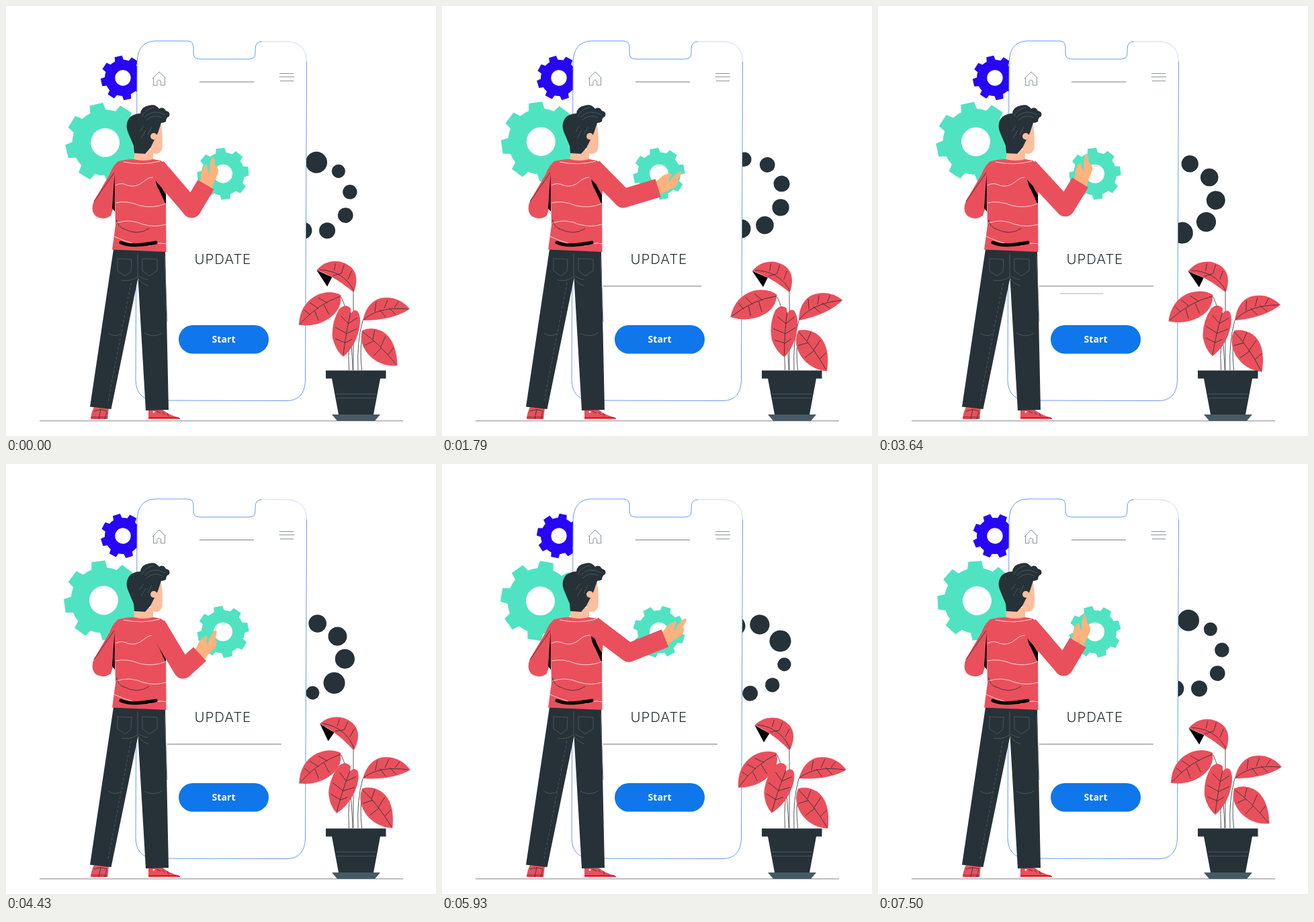
Animation, 640 px wide and 640 px high, one loop 7710 ms. Source, as an HTML page:

```html
<!DOCTYPE html>
<html lang="en">
<head>
<meta charset="utf-8">
<title>Update</title>
<style>
  html, body { margin: 0; width: 100%; height: 100%; overflow: hidden; background: #fff; }
  svg { display: block; width: 100vw; height: 100vh; }
  .ink { fill: #263238; }
  .red { fill: #e9505c; }
  .teal { fill: #50e3c2; }
  .skin { fill: #ffbe9d; }
  .line { fill: none; stroke: #263238; stroke-width: .8; }
  .faint { fill: none; stroke: #55666f; stroke-width: .7; }
  .wave { fill: none; stroke: #ffe3e3; stroke-width: .9; }
  .rule { fill: none; stroke: #555; stroke-width: .8; }
</style>
</head>
<body>
<svg viewBox="0 0 640 640">
  <path id="blueGear" fill="#2705f5" fill-rule="evenodd"/>
  <path id="bigGear" class="teal" fill-rule="evenodd"/>
  <g id="dots" class="ink"></g>

  <!-- phone -->
  <path fill="#fff" d="M195 84Q196 53 222 52H270Q279 52 279 62V70Q279 79 288 79H362Q371 79 371 70V64Q371 53 381 53H418Q447 54 447.500 83L445.500 558Q444 586 420 587.500L218 587Q194 584 193 557Z"/>
  <g fill="none" stroke="#4380f2" stroke-width=".8">
    <path d="M381 53Q371 53 371 64V70Q371 79 362 79H288Q279 79 279 70V62Q279 52 270 52H222Q196 53 195 84L193 557Q194 584 218 587L420 587.500Q444 586 445.500 558L447.500 83"/>
    <path stroke="#bccdf5" d="M381 53H418Q447 54 447.500 83"/>
  </g>
  <path class="faint" d="M218 108L228 98 237 107M219.500 107V118H225V112Q228 108.500 230.500 112V118H236.500V106.500"/>
  <path class="faint" d="M407 100.500H428M406.500 105.500H429M408 111.500H428"/>
  <path class="rule" d="M288 113H369"/>
  <path id="phoneGear" class="teal" fill-rule="evenodd"/>
  <text x="322.800" y="384" text-anchor="middle" font-family="Inter, sans-serif" font-size="20.500" font-weight="300" letter-spacing=".9" class="ink">UPDATE</text>
  <path id="rule1" class="rule"/>
  <path id="rule2" class="rule" style="stroke:#999"/>
  <rect x="257" y="475" width="134" height="42.500" rx="21.200" fill="#0f76ec"/>
  <text x="324" y="500.500" text-anchor="middle" font-family="'Open Sans', sans-serif" font-size="14" font-weight="700" letter-spacing=".1" fill="#fff">Start</text>

  <path d="M50 617.500H591" stroke="#8c8c8c" stroke-width="1.200"/>

  <!-- plant -->
  <path class="line" d="M517 424V542M511 500Q509 520 510.500 542M531 468Q522 500 524 542M531 486Q526 510 529.500 542M499 433Q514 465 516 542"/>
  <g id="leaves"></g>
  <path fill="#455a64" d="M485 608H557L549 617.500H493Z"/>
  <path class="ink" d="M476 542.500H565.500V554.500H557L547 608H495L485 554.500H476Z"/>
  <path class="faint" d="M491 577.500H551M492 583.500H550"/>

  <!-- man -->
  <path class="red" d="M131 597L153 599 151 615H126Q127 604 131 597ZM212 601H233Q245 610 259 613V615H212Z"/>
  <path class="line" d="M131 603Q141 599 150 603L147 615M141 600L138 615M126 612H151M224 603L230 606M233 604L236 608M240 606L242 611M212 612.500H257"/>
  <circle cx="220" cy="604" r="1.500" fill="#fff"/>
  <path class="ink" d="M160 362L237 365 242 601 208 602 196.500 405 156.500 600 125 596.500Z"/>
  <path class="faint" d="M166 376L187 377 186 395 177 402 166 394ZM203 376L225 377V394L213 402 203 394ZM196 368V404Q200 412 212 417M196 403Q184 411 172 408M198 402Q206 407 211 407M152 487Q162 494 172 487M206 487Q221 495 233 486M236 372L240 470"/>
  <path class="faint" stroke-dasharray="4 3" d="M186 412L152 588"/>
  <path class="skin" d="M192 214H219V231Q204 236 190 230Z"/>
  <path class="skin" d="M229 172Q234 184 232.500 211Q231 220 222 220L216 218 212 196Z"/>
  <path class="ink" d="M191 219L190 208 182 189Q176 175 185 165 192 160 200 160 201 150 213 148 222 145 228 153 234 149 238 156 245 157 243 164 238 166 238 172 235 174 231 174L226 189 215 211 207 220Z"/>
  <circle cx="220" cy="194" r="5" class="skin"/>
  <path class="faint" d="M202 165Q207 153 220 151M206 166Q218 152 237 162M209 170Q220 160 232 166M199 187L205 178M201 197L208 185M211 192L217 180"/>
  <path class="red" d="M166 232Q176 228 190 228 204 232 219 228L230 230Q242 236 242 248L238 285 238.500 366 158 362.500 163 326 161 250Z"/>
  <path class="red" d="M169 230Q160 235 154 251L131 290Q125 305 134 313 145 320 156 312L160 300 164 250Z"/>
  <path d="M161.500 250L158 301 162 306ZM223 246Q220 262 228 274L238 296V281Q229 268 223 246Z"/>
  <path class="line" d="M161 248L131 291"/>
  <path class="wave" d="M175 232Q202 238 229 231M163 267Q171 262 181 267 194 271 205 261 213 254 222 255M163 293Q180 289 199 297 219 302 238 294M164 323Q184 316 204 325 222 330 238 325M161 343Q176 350 188 353M212 357Q225 351 238 354"/>
  <path class="line" d="M174 331Q196 343 213 331M164 318Q167 328 175 332"/>
  <path fill="none" stroke="#000" stroke-width="5" stroke-linecap="round" d="M171 352Q182 357 198 355.500T223 352"/>
  <path id="hand" fill="#ffb27d" d="M-5-9L8-10Q18-13 28-8 30-5 22-3L17 2Q30-4 41-2 44 0 41 2L31 6Q30 13 20 13L8 11-5 10Z"/>
  <path id="arm" fill="none" stroke="#e9505c" stroke-width="28" stroke-linejoin="round"/>
</svg>
<script>
const LOOP = 7710, END = 7500, FPS = 14;
const $ = id => document.getElementById(id);
const rad = deg => deg * Math.PI / 180;
const set = (el, attrs) => { for (const k in attrs) el.setAttribute(k, attrs[k]); };
const add = (parent, tag, attrs) => {
  const el = document.createElementNS("http://www.w3.org/2000/svg", tag);
  set(el, attrs);
  return parent.appendChild(el);
};

// Swings around mid, `cycles` times per loop; highest at `peak` of a cycle.
const swing = (mid, amp, cycles, peak) => p => mid + amp * Math.cos(2 * Math.PI * (cycles * p - peak));
const rise = (t, from, to) => Math.min(1, Math.max(0, (t - from) / (to - from)));
// Nearly steady, settling at the end.
const settle = p => p + .45 * p ** 3 * (1 - p);

function gearPath(tip, root, hole, phase, ox = 0, oy = 0) {
  const at = (r, a) => `${ox + r * Math.cos(rad(a))} ${oy + r * Math.sin(rad(a))}`;
  let d = "";
  for (let k = 0; k < 8; k++) {
    const a = phase + k * 45;
    d += `${k ? `A${root} ${root} 0 0 1 ` : "M"}${at(root, a - 14)}L${at(tip, a - 9.7)} ${at(tip, a + 9.7)} ${at(root, a + 14)}`;
  }
  d += `A${root} ${root} 0 0 1 ${at(root, phase - 14)}Z`;
  return d + `M${ox + hole} ${oy}a${hole} ${hole} 0 1 0 ${-2 * hole} 0a${hole} ${hole} 0 1 0 ${2 * hole} 0Z`;
}
set($("bigGear"), { d: gearPath(59.5, 49, 21.5, -103, 1, .6) });
set($("blueGear"), { d: gearPath(33.2, 27, 11.7, -102) });
set($("phoneGear"), { d: gearPath(38.7, 32, 14, -96) });

for (let k = 0; k < 9; k++) {
  const a = rad(-88 + k * 39.5);
  add($("dots"), "circle", { cx: 4.8 + 52.3 * Math.cos(a), cy: 52.3 * Math.sin(a), r: k ? 9.4 + .65 * k : 16 });
}

const leaves = [
  { pivot: "517 426", sway: swing(3.2, 5.2, 4, .33), under: "M462 394L485 404 478 418Z",
    shape: "M517 426Q490 403 462 394 475 378 496 380.500 523 387 521 412 520 422 517 426Z",
    veins: "M518 424Q502 394 466 393M509 407L514 394M499 398L503 385M488 394L490 383M499 398L486 402" },
  { pivot: "499 432", sway: swing(5, 8.5, 1, .29),
    shape: "M498 430Q482 423 463 432 438 446 438 478 468 480 488 461 501 448 498 430Z",
    veins: "M498 432Q465 445 440 476M479 443L465 436M466 452L453 444M454 462L445 455M474 446L482 460M461 456L467 470" },
  { pivot: "531 468", sway: swing(0, 12, 5, .75),
    shape: "M531 468Q537 441 557 435 583 430 601 451 575 468 531 468Z",
    veins: "M532 467Q555 447 598 451M549 455L551 440M563 450L568 437M578 449L584 440M556 452L565 463M570 449L580 459" },
  { pivot: "530 484", sway: swing(6.5, 6.5, 3, .56),
    shape: "M530 483Q543 477 558 483 581 494 583 535 557 537 540 519 525 502 530 483Z",
    veins: "M531 485Q555 502 581 533M546 496L549 482M558 507L565 491M569 519L577 508M548 498L534 505M559 508L547 521" },
  { pivot: "512 450", sway: swing(2, 8.2, 1, .71),
    shape: "M513 450Q505 442 496 451 484 471 486 494 490 512 502 522 518 508 524 487 530 466 524 455 518 450 513 458Z",
    veins: "M513 456Q506 485 502 519M509 472L498 461M506 487L490 478M504 501L490 495M509 473L523 464M506 488L523 480M504 502L515 496" }
].map(({ pivot, sway, under, shape, veins }) => {
  const g = add($("leaves"), "g", {});
  if (under) add(g, "path", { d: under });
  add(g, "path", { class: "red", d: shape });
  add(g, "path", { class: "line", d: veins });
  return { g, pivot, sway };
});

const arm = {
  elbowX: swing(274, 13, 2, .78),
  elbowY: swing(293, 13, 2, .14),
  cuffX: swing(311, 23, 2, .65),
  cuffY: swing(267, 18, 2, .26),
  hand: swing(-55, 22, 2, .43)
};

function draw(t) {
  const p = t / END, spin = -settle(p);
  set($("bigGear"), { transform: `translate(146.600 202.700) rotate(${350 * spin})` });
  set($("blueGear"), { transform: `translate(174 107) rotate(${-350 * spin})` });
  set($("phoneGear"), { transform: `translate(323 249.700) rotate(${-350 * spin})` });
  set($("dots"), { transform: `translate(455.400 285) rotate(${360 * spin})` });
  for (const leaf of leaves) set(leaf.g, { transform: `rotate(${leaf.sway(p)} ${leaf.pivot})` });

  const x = arm.cuffX(p), y = arm.cuffY(p);
  set($("arm"), { d: `M224 240L${arm.elbowX(p)} ${arm.elbowY(p)} ${x} ${y}` });
  set($("hand"), { transform: `translate(${x} ${y}) rotate(${arm.hand(p)})` });

  // The upper rule starts behind the leg and is drawn twice.
  const upper = t < 2200 ? rise(t, 0, 2060) : rise(t, 2400, 3400);
  const lower = rise(t, 2000, 2750) * (1 - rise(t, 3300, 4300));
  set($("rule1"), { d: `M240 417H${Math.max(240, 230 + 180 * upper)}` });
  set($("rule2"), { d: `M271 428H${271 + 98 * lower}` });
}

const start = performance.now();
function tick() {
  const t = (performance.now() - start) % LOOP;
  draw(Math.min(END, Math.floor((t + 10) * FPS / 1000) * 1000 / FPS));
  requestAnimationFrame(tick);
}
tick();
</script>
</body>
</html>
```
